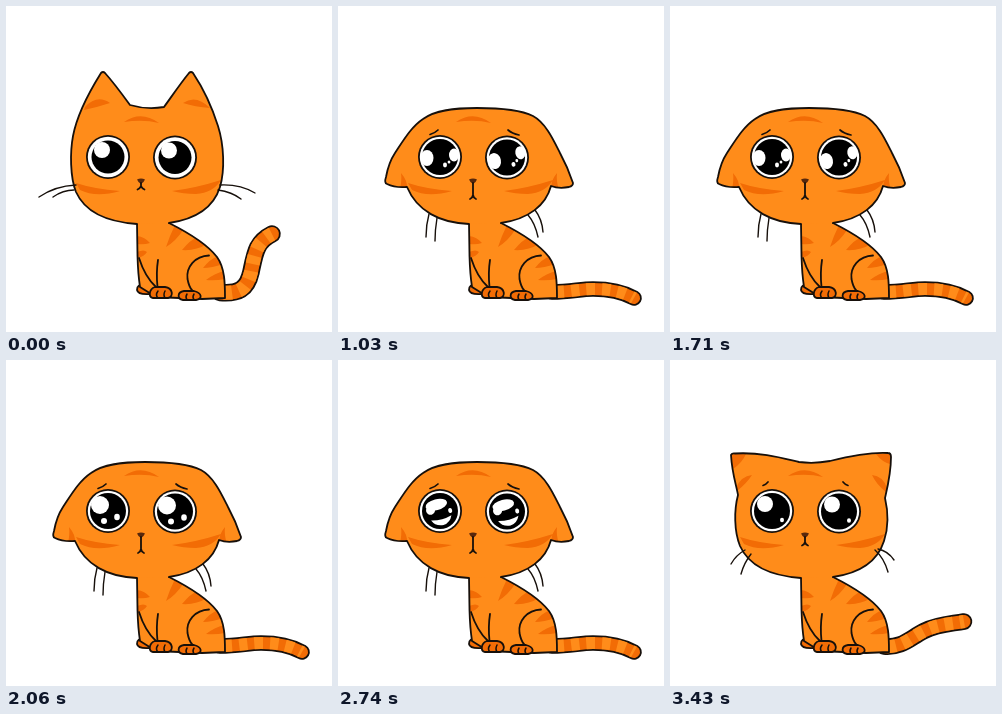
An HTML page with a canvas that plays this animation: 326 px wide and 326 px high, repeating every 3600 ms.

```html
<!DOCTYPE html>
<html lang="en">
<head>
<meta charset="utf-8">
<title>Sad kitten</title>
<style>
html, body { margin: 0; width: 100%; height: 100%; overflow: hidden; background: #fff; }
canvas { display: block; width: 326px; height: 326px; }
</style>
</head>
<body>
<canvas id="stage"></canvas>
<script>
const LOOP = 3600;
const FUR = '#ff8c1a', STRIPE = '#f26c05', INK = '#17100b', WHITE = '#fff';
const canvas = document.getElementById('stage');
const ctx = canvas.getContext('2d');
const ratio = window.devicePixelRatio || 1;
canvas.width = canvas.height = 326 * ratio;

// Poses: ears up, ears half lowered, ears drooping
const poses = {
  alert: {
    head: 'M131 218C102 216 79 206 70 186C64 171 64 146 67 130C71 109 85 83 95 67Q97 65 99 67C108 77 116 88 124 99Q141 104 158 101C166 90 174 78 183 67Q185 65 187 67C197 82 206 101 212 120C218 139 219 164 214 181C208 200 191 213 163 217',
    marks: 'M79 101Q91 88 104 97Q92 101 78 104ZM177 97Q190 88 204 102Q189 101 177 97Z',
    whiskers: 'M70 179Q49 180 33 191M68 184Q57 184 47 191M214 179Q234 178 249 187M212 184Q226 186 235 193',
    mouth: 'M135 177V180M131.5 183.5Q134 182.5 135 180Q136 182.5 138.5 183.5',
    brows: '',
    tail: 'M214 286.5C232 288 241 284 245 266C249 247 250 236 266 228',
    tailWidth: 14
  },
  worried: {
    head: 'M131 218C102 216 79 206 70 186C64 171 64 150 68 135C66 124 62 113 61 95Q62 93 65 93.5C91 92 112 98 129 102Q144 104 160 101C180 96 201 92 218 93Q221 93 221 97C221 113 218 125 215 138C219 155 218 169 214 181C208 200 191 213 163 217',
    marks: 'M61 94L76 94Q72 103 63 109ZM66 128Q71 116 82 115Q77 123 67 131ZM206 94L221 94L220 104Q212 102 206 94ZM202 115Q213 116 217 128L216 132Q206 124 202 115Z',
    whiskers: 'M75 190Q66 195 61 204M81 194Q74 203 71 214M205 190Q214 198 218 212M208 189Q218 191 224 200',
    mouth: 'M135 177V183M132 185.5Q134.5 184.5 135 182Q135.5 184.5 138 185.5',
    brows: 'M93 125.5Q96 124.5 98 122M173 122Q175 124.5 178 125.5',
    tail: 'M214 286.5C232 288 240 278 254 271C268 264 280 264 294 261.5',
    tailWidth: 13
  },
  sad: {
    head: 'M131 218C102 217 79 205 69 181Q57 182 49 178Q46 177 48 171C50 160 53 153 57 147C65 135 73 121 85 113C97 104 116 102 139 102C164 102 183 104 195 110C208 117 216 135 222 147C228 158 232 168 235 177Q235 180 231 181Q221 183 213 180C208 199 191 213 163 217',
    marks: 'M62 183Q64 174 63 167Q70 175 69 183ZM213 183Q213 174 219 167Q218 175 221 184Z',
    whiskers: 'M91 208Q88 219 88 231M99 212Q97 224 97 235M190 209Q197 217 200 231M197 204Q204 213 205 226',
    mouth: 'M135 177V190M132 193Q134.5 192 135 189Q135.5 192 138 193',
    brows: 'M92 128.5Q97 127 100 124M170 124Q174 127.5 181 129',
    tail: 'M214 286C233 286 242 283 255 283C273 283 285 286 296 292',
    tailWidth: 12
  }
};

// Glints as [x, y, rx, ry] offsets from the eye centre
const glints = {
  calm: [[-6, -7, 8, 8]],
  wet: [[-7, -7, 8, 8], [10, 9, 2, 2.2]],
  upper: [[-8, -6, 9, 9], [-4, 10, 3, 3], [9, 6, 2.8, 3.2]],
  side: [[-13, 1, 6.5, 8], [14, -2, 5, 6.5], [5, 8, 2, 2.4], [9, 5, 1.4, 1.6]],
  low: [[-6, -7, 9, 7], [10, 2, 2, 2.5]],
  smile: [[-2, -7, 11, 5.5], [-9, -3, 4.5, 4.5], [10, 2, 2, 2.5]]
};

// Start time, pose, eye state
const timeline = [
  [0, 'alert', 'calm'], [510, 'worried', 'wet'], [690, 'sad', 'upper'],
  [1030, 'sad', 'side'], [1200, 'sad', 'low'], [1370, 'sad', 'smile'],
  [1540, 'sad', 'upper'], [1710, 'sad', 'side'], [1890, 'sad', 'smile'],
  [2060, 'sad', 'upper'], [2400, 'sad', 'side'], [2570, 'sad', 'low'],
  [2740, 'sad', 'smile'], [2910, 'sad', 'upper'], [3090, 'sad', 'smile'],
  [3260, 'sad', 'low'], [3430, 'worried', 'wet']
];

function fill(d, color) {
  ctx.fillStyle = color;
  ctx.fill(new Path2D(d));
}

function line(d, width = 1.8, color = INK) {
  ctx.strokeStyle = color;
  ctx.lineWidth = width;
  ctx.stroke(new Path2D(d));
}

function shape(d, marks = '', color = FUR) {
  fill(d, color);
  ctx.save();
  ctx.clip(new Path2D(d));
  fill(marks, STRIPE);
  ctx.restore();
  line(d);
}

function oval(x, y, rx, ry, color) {
  ctx.fillStyle = color;
  ctx.beginPath();
  ctx.ellipse(x, y, rx, ry, 0, 0, Math.PI * 2);
  ctx.fill();
}

function drawTail({ tail, tailWidth }) {
  line(tail, tailWidth + 3.6);
  line(tail, tailWidth, STRIPE);
  ctx.save();
  ctx.lineCap = 'butt';
  ctx.setLineDash([8.5, 7]);
  ctx.lineDashOffset = -3.5;
  line(tail, tailWidth, FUR);
  ctx.restore();
}

function drawBody() {
  shape('M138 279Q131 278 131 284Q132 289 144 288', '', STRIPE);
  shape('M131 217L131.5 250Q132 268 134 281L150 291L196 293L219 292C219 278 219 262 211 251C201 238 183 227 163 217',
    'M160 241Q164 229 169 219L177 224Q170 235 160 241ZM176 244Q184 234 193 230L201 238Q190 245 176 244ZM197 262Q204 253 212 250L217 258Q206 262 197 262ZM200 274Q209 267 219 265V273Q209 275 200 274ZM131 230Q139 231 144 237Q138 239 131 238ZM131 246Q138 243 141 246Q138 251 131 252Z');
  line('M133 252Q139 271 150 281M152 254Q150 267 151.5 281M203 249.5C189 250 180 261 181.5 273Q183 281 186 284');
  shape('M149 281C143 283 142 291 147 292H162C168 291 167 282 159 281Z', '', STRIPE);
  shape('M178 285C171 286 171 293 177 294H190C197 293 196 287 188 285Z', '', STRIPE);
  line('M152 285Q149 289 152 292M159 285Q157 289 159 292M181 288Q179 291 181 294M188 288Q186 291 188 294', 1.5);
}

function drawEye(x, y, look, tilt) {
  const sad = !['calm', 'wet'].includes(look);
  const pupil = look === 'calm' ? 16.5 : 18;
  ctx.save();
  ctx.translate(x, y);
  oval(0, 0, 22, 22, INK);
  oval(0, 0, 20.2, 20.2, WHITE);
  oval(0, 0, pupil, pupil, '#000');
  if (look === 'smile' || look === 'low') tilt = -0.25;
  if (sad && look !== 'upper') ctx.rotate(tilt);
  for (const spot of glints[look]) oval(...spot, WHITE);
  if (look === 'smile' || look === 'low') fill('M-11 7Q0 10 10 7Q7 14 0 14.5Q-8 14 -11 7Z', WHITE);
  ctx.restore();
}

function drawHead(pose, look) {
  const face = 'M118 116Q135 104 153 117Q137 113 118 116ZM70 177Q88 183 114 185Q90 192 74 184ZM166 185Q190 182 215 174Q207 187 190 188Q177 188 166 185Z';
  shape(pose.head, face + pose.marks);
  line(pose.whiskers, 1.4);
  line(pose.brows, 1.7);
  drawEye(102, 151, look, 0);
  drawEye(169, 151.5, look, -0.2);
  fill('M131 173.5Q135 171.5 139 173.5Q137.5 177 135 178Q132.5 177 131 173.5Z', '#58280c');
  line(pose.mouth, 1.8);
}

function draw(time) {
  const [, name, look] = timeline.findLast(([start]) => start <= time);
  const pose = poses[name];
  ctx.setTransform(ratio, 0, 0, ratio, 0, 0);
  ctx.fillStyle = WHITE;
  ctx.fillRect(0, 0, 326, 326);
  ctx.lineCap = ctx.lineJoin = 'round';
  drawTail(pose);
  drawBody();
  drawHead(pose, look);
}

function tick() {
  draw(performance.now() % LOOP);
  requestAnimationFrame(tick);
}
tick();
</script>
</body>
</html>
```
